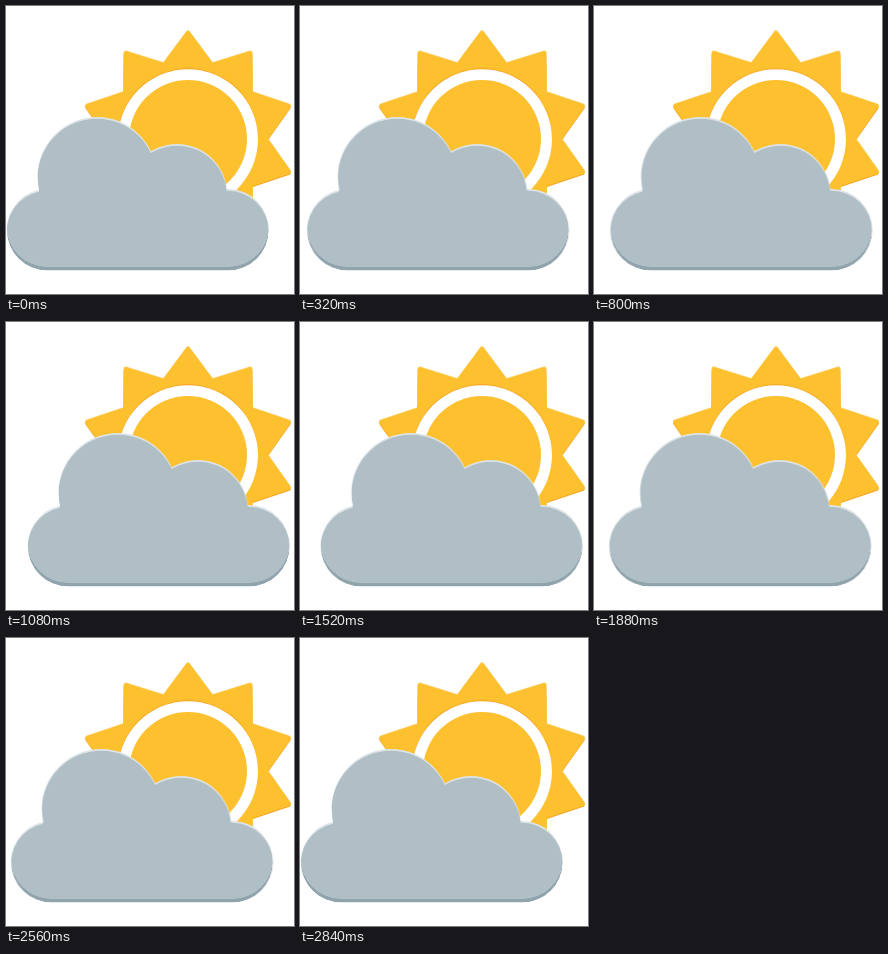
Recreate the animation shown at these times as an HTML page. Size 288 px wide and 288 px high, loop 2880 ms.

```html
<!DOCTYPE html>
<html lang="en">
<head>
<meta charset="utf-8">
<title>Partly cloudy</title>
<style>
  html, body { margin: 0; width: 100%; height: 100%; overflow: hidden; background: #fff; }
  svg { display: block; width: 100%; height: 100%; }
  .ray { stroke-width: 4; stroke-linejoin: round; }
  .main { fill: #fdc02f; stroke: #fdc02f; }
  .light { fill: #fdd574; stroke: #fdd574; }
  .shade { fill: #f6a224; stroke: #f6a224; }
  #cloud { animation: drift 2880ms -1ms infinite; }
  /* out in 31 ticks, back in 40, then one tick of rest */
  @keyframes drift {
    0% { transform: translateX(0); animation-timing-function: steps(31, end); }
    43.0556% { transform: translateX(24px); animation-timing-function: steps(40, end); }
    98.6111%, 100% { transform: translateX(0); }
  }
</style>
</head>
<body>
<svg viewBox="0 0 288 288">
  <defs>
    <polygon id="star"/>
    <path id="puff" d="M31.5 170.5a59.5 59.5 0 0 1 119 0a59.5 59.5 0 0 1 -119 0z
      M121 188a50 50 0 0 1 100 0a50 50 0 0 1 -100 0z
      M41.5 183H222a40.8 40.8 0 0 1 0 81.6H41.5a40.8 40.8 0 0 1 0 -81.6z"/>
    <clipPath id="outline"><use href="#puff"/></clipPath>
    <clipPath id="lower"><use href="#puff" y="1.8"/></clipPath>
  </defs>

  <g id="sun">
    <use href="#star" class="ray shade" y="1"/>
    <use href="#star" class="ray light" y="-0.8"/>
    <use href="#star" class="ray main"/>
    <circle cx="182" cy="132.3" r="70" fill="#f6a224"/>
    <circle cx="182" cy="133.2" r="70" fill="#fff"/>
    <circle cx="182" cy="133" r="59" fill="#fdc02f"/>
  </g>

  <g id="cloud">
    <g clip-path="url(#outline)">
      <use href="#puff" fill="#90a4ae"/>
      <use href="#puff" y="-4" fill="#dce4e8"/>
      <g clip-path="url(#lower)"><use href="#puff" y="-4" fill="#b0bec5"/></g>
    </g>
  </g>
</svg>
<script>
  const points = Array.from({ length: 20 }, (_, i) => {
    const angle = (i * 18 - 90) * Math.PI / 180;
    const radius = i % 2 ? 77.6 : 106;
    return [182 + radius * Math.cos(angle), 133 + radius * Math.sin(angle)];
  });
  document.getElementById("star").setAttribute("points", points.join(" "));
</script>
</body>
</html>
```
